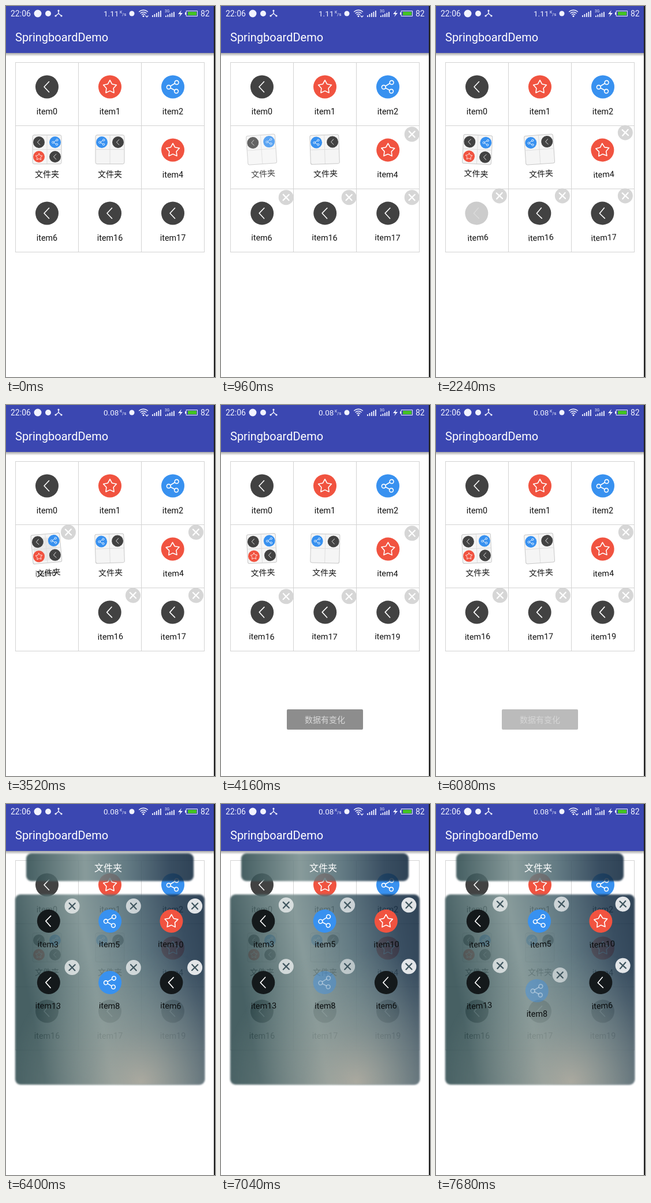
An HTML page with a canvas that plays this animation: 362 px wide and 640 px high, repeating every 8000 ms.

```html
<!DOCTYPE html>
<html lang="zh">
<head>
<meta charset="utf-8">
<title>SpringboardDemo</title>
<style>
  html, body { margin: 0; width: 100%; height: 100%; overflow: hidden; background: #fff; }
  canvas { display: block; width: 362px; height: 640px; }
</style>
</head>
<body>
<canvas id="stage" width="362" height="640"></canvas>
<script>
const ctx = document.getElementById('stage').getContext('2d');
const FONT = 'Roboto, "Noto Sans CJK SC", "Noto Sans CJK", sans-serif';
const LOOP = 8000, STEP = 320, EDIT_START = 960, POPUP_START = 6400;
const COLORS = { back: '#424242', star: '#f15340', share: '#3891f0' };
const FOLDER = '文件夹';

// Known angles in degrees: [step since edit start, angle]
const ITEM_SWING = [[0, 1], [4, -3], [8, -1.5], [13, .7], [17, 1.5], [21, -3.5]];
const FOLDER_SWINGS = [
  [[0, -4], [4, 3], [8, -5], [13, -4], [17, 2]],
  [[0, -2], [4, -4], [8, -2], [13, 2.5], [17, -2]]
];

function swing(keys, step) {
  let i = 0;
  while (i < keys.length - 2 && step >= keys[i + 1][0]) i++;
  const [s0, a0] = keys[i], [s1, a1] = keys[i + 1];
  const f = Math.min(1, (step - s0) / (s1 - s0));
  return a0 + (a1 - a0) * f + 3 * Math.sin(2 * Math.PI * f);
}

function at(x, y, degrees, draw, alpha = 1) {
  ctx.save();
  ctx.translate(x, y);
  ctx.rotate(degrees * Math.PI / 180);
  ctx.globalAlpha *= alpha;
  draw();
  ctx.restore();
}

function text(str, x, y, size, color, align = 'center') {
  ctx.font = `${size}px ${FONT}`;
  ctx.textAlign = align;
  ctx.textBaseline = 'alphabetic';
  ctx.fillStyle = color;
  ctx.fillText(str, x, y);
}

function disc(x, y, r, color) {
  ctx.fillStyle = color;
  ctx.beginPath();
  ctx.arc(x, y, r, 0, 7);
  ctx.fill();
}

function ring(x, y, r) {
  ctx.beginPath();
  ctx.arc(x, y, r, 0, 7);
  ctx.stroke();
}

function line(points, closed) {
  ctx.beginPath();
  points.forEach(([x, y]) => ctx.lineTo(x, y));
  if (closed) ctx.closePath();
  ctx.stroke();
}

function pen(color, width) {
  ctx.strokeStyle = color;
  ctx.lineWidth = width;
  ctx.lineJoin = ctx.lineCap = 'round';
}

function box(x, y, w, h, r, color) {
  ctx.fillStyle = color;
  ctx.beginPath();
  ctx.roundRect(x, y, w, h, r);
  ctx.fill();
}

function icon(kind, x, y, scale = 1, color = COLORS[kind]) {
  ctx.save();
  ctx.translate(x, y);
  ctx.scale(scale, scale);
  disc(0, 0, 20, color);
  pen('#fff', 1.6);
  if (kind === 'back') {
    line([[3.5, -9], [-5, 0], [3.5, 9]]);
  } else if (kind === 'star') {
    line(Array.from({ length: 10 }, (_, i) => {
      const r = i % 2 ? 6.4 : 12, a = (i / 5 - .5) * Math.PI;
      return [r * Math.cos(a), r * Math.sin(a) + .5];
    }), true);
  } else {
    line([[-4, -1.5], [3.5, -6]]);
    line([[-4, 2], [3, 5.8]]);
    ring(-7.2, .5, 3.4);
    ring(6.6, -7.5, 3.4);
    ring(6, 7.5, 3.4);
  }
  ctx.restore();
}

function closeButton(x, y, fill, cross) {
  disc(x, y, 13, fill);
  pen(cross, 2.2);
  line([[x - 5, y - 5], [x + 5, y + 5]]);
  line([[x + 5, y - 5], [x - 5, y + 5]]);
}

// Cells are drawn around their own centre
function item(kind, label, { editing = false, iconAlpha = 1, textColor = '#111' } = {}) {
  ctx.save();
  ctx.globalAlpha *= iconAlpha;
  icon(kind, 0, -12);
  ctx.restore();
  text(label, 0, 35, 14.3, textColor);
  if (editing) closeButton(41, -40, '#d6d6d6', '#fff');
}

function folder(kinds) {
  box(-25, -38, 50, 50, 3, 'rgba(242,242,242,.75)');
  pen('#c8c8c8', 1);
  ctx.stroke();
  pen('#dedede', 1);
  line([[0, -37], [0, 11]]);
  line([[-24, -13], [24, -13]]);
  kinds.forEach((kind, i) => icon(kind, i % 2 ? 14 : -14, i < 2 ? -25.5 : -.5, .5));
  text(FOLDER, 0, 34, 14, '#111');
}

function statusBar(t) {
  const white = '#f2f3ff';
  text('22:06', 8, 18, 14, white, 'left');
  disc(55, 13, 6.5, white);
  disc(73, 13, 5, white);
  pen(white, 1.4);
  line([[91, 8], [91, 13], [86, 17]]);
  line([[91, 13], [96, 17]]);
  [[91, 8], [86, 17], [96, 17]].forEach(([x, y]) => disc(x, y, 1.6, white));
  text(t < 2880 ? '1.11' : '0.08', 169, 18, 13.5, white, 'left');
  text('K', 197, 13, 7, white, 'left');
  text('/s', 201, 17, 8, white, 'left');
  disc(218, 13, 4.5, white);

  pen(white, 1.4);
  [4, 7.5, 11].forEach(r => {
    ctx.beginPath();
    ctx.arc(238, 18, r, -2.3, -.84);
    ctx.stroke();
  });
  disc(238, 17.5, 1.5, white);
  if (t < 1920 || (t >= 2880 && t < 3840) || t >= 6720) {
    line([[242, 17], [244, 19], [246, 17]]);
  }

  ctx.fillStyle = white;
  for (let i = 0; i < 5; i++) {
    const h = 3 + i * 2;
    ctx.fillRect(253 + i * 3.5, 19 - h, 1.8, h);
    ctx.fillRect(276 + i * 3.5, 19 - h * .8, 1.8, h * .8);
  }
  text('3G', 275, 11, 6.5, white, 'left');

  ctx.fillStyle = white;
  ctx.beginPath();
  [[304, 7], [298, 14], [302, 14], [300, 19], [306, 12], [302, 12]].forEach(([x, y]) => ctx.lineTo(x, y));
  ctx.fill();
  ctx.fillRect(310, 11, 2, 4);
  pen(white, 1);
  ctx.strokeRect(312.5, 8.5, 19, 9);
  ctx.fillStyle = '#45c522';
  ctx.fillRect(315, 10, 15, 6);
  text('82', 337, 18, 14, white, 'left');
}

function appBar(t) {
  ctx.fillStyle = '#3b47b1';
  ctx.fillRect(0, 0, 362, 81);
  const shadow = ctx.createLinearGradient(0, 81, 0, 87);
  shadow.addColorStop(0, 'rgba(0,0,0,.35)');
  shadow.addColorStop(1, 'rgba(0,0,0,0)');
  ctx.fillStyle = shadow;
  ctx.fillRect(0, 81, 362, 6);
  statusBar(t);
  text('SpringboardDemo', 16, 61, 20, '#fff', 'left');
}

function grid() {
  ctx.fillStyle = '#d3d3d3';
  for (let i = 0; i < 4; i++) {
    ctx.fillRect(16 + 109 * i, 97, 1, 328);
    ctx.fillRect(16, 97 + 109 * i, 328, 1);
  }
}

function board(t, step) {
  const editing = t >= EDIT_START && t < POPUP_START;
  const angle = editing ? swing(ITEM_SWING, step) : 0;
  const place = (index, degrees, draw, alpha, dx = 0, dy = 0) =>
    at(71 + 109 * (index % 3) + dx, 151.5 + 109 * Math.floor(index / 3) + dy, degrees, draw, alpha);

  grid();
  ['back', 'star', 'share'].forEach((kind, i) => place(i, 0, () => item(kind, 'item' + i)));
  place(5, angle, () => item('star', 'item4', { editing }));

  const dropped = t >= 3840;
  const names = dropped ? ['item16', 'item17', 'item19'] : ['item6', 'item16', 'item17'];
  names.forEach((name, i) => {
    if (name !== 'item6') place(6 + i, angle, () => item('back', name, { editing }));
  });

  if (!dropped) {
    const held = t >= 1920;
    const drag = Math.min(1, Math.max(0, (t - 2560) / 960));
    const eased = drag * drag * (3 - 2 * drag);
    place(6, angle, () => item('back', 'item6', {
      editing, iconAlpha: held ? .27 : 1, textColor: drag === 1 ? '#666' : '#111'
    }), 1, -3 * eased, -109 * eased);
  }

  const pressed = t === EDIT_START;
  const first = ['back', 'share', 'star', 'back'];
  const contents = [pressed ? first.slice(0, 2) : first, ['share', 'back']];
  contents.forEach((kinds, i) =>
    place(3 + i, editing ? swing(FOLDER_SWINGS[i], step) : 0, () => folder(kinds), pressed && !i ? .82 : 1));
}

function toast(t) {
  const alpha = Math.min(1, (t - 3520) / 960, (6400 - t) / 800);
  if (alpha <= 0) return;
  ctx.save();
  ctx.globalAlpha = alpha;
  box(114, 525, 132, 35, 2, '#555');
  text('数据有变化', 180, 548, 14, '#fff');
  ctx.restore();
}

function panel(x, y, w, h, glow) {
  const base = ctx.createLinearGradient(x, y + h * .2, x + w, y);
  [[0, '#2b484c'], [.35, '#768c8c'], [.6, '#4c6771'], [.85, '#1c344a'], [1, '#10273d']]
    .forEach(([stop, color]) => base.addColorStop(stop, color));
  ctx.save();
  ctx.filter = 'blur(1.5px)';
  ctx.globalAlpha = .87;
  box(x, y, w, h, 9, base);
  if (glow) {
    const light = ctx.createRadialGradient(235, 480, 0, 235, 480, 230);
    light.addColorStop(0, 'rgba(182,176,163,.95)');
    light.addColorStop(.4, 'rgba(150,158,152,.6)');
    light.addColorStop(1, 'rgba(130,150,148,0)');
    box(x, y, w, h, 9, light);
  }
  ctx.restore();
}

function popup(t, step) {
  panel(35, 85, 290, 48, false);
  panel(16, 156, 328, 328, true);
  text(FOLDER, 177, 116, 16, '#fff');
  const angle = swing(ITEM_SWING, step);
  const items = [['back', 3], ['share', 5], ['star', 10], ['back', 13], ['share', 8], ['back', 6]];
  items.forEach(([kind, number], i) => {
    const held = number === 8 && t >= 7040;
    const pull = held ? Math.max(0, (t - 7040) / 640) ** 2 : 0;
    const x = 73.5 + 106.3 * (i % 3) - 5 * pull;
    const y = 214 + 106 * Math.floor(i / 3) + 14 * pull;
    at(x, y, held ? angle * (1 - pull) : angle, () => {
      ctx.save();
      if (held) ctx.globalAlpha = .4;
      icon(kind, 0, -12, 1, kind === 'back' ? '#14191b' : COLORS[kind]);
      ctx.restore();
      text('item' + number, 0, 33, 14.3, '#0a0d0e');
      const opacity = held ? .55 : i % 3 === 2 ? .86 : .68;
      closeButton(40, -39, `rgba(255,255,255,${opacity})`, '#40565f');
    });
  });
}

function draw(t) {
  const step = (t - EDIT_START) / STEP;
  ctx.fillStyle = '#fff';
  ctx.fillRect(0, 0, 362, 640);
  appBar(t);
  board(t, step);
  toast(t);
  if (t >= POPUP_START) popup(t, step);
  ctx.fillStyle = '#1c1c1c';
  ctx.fillRect(360, 0, 2, 640);
}

const start = performance.now();
function frame() {
  const t = (performance.now() - start) % LOOP;
  draw(t < EDIT_START ? 0 : Math.floor(t / STEP) * STEP);
  requestAnimationFrame(frame);
}
frame();
</script>
</body>
</html>
```
